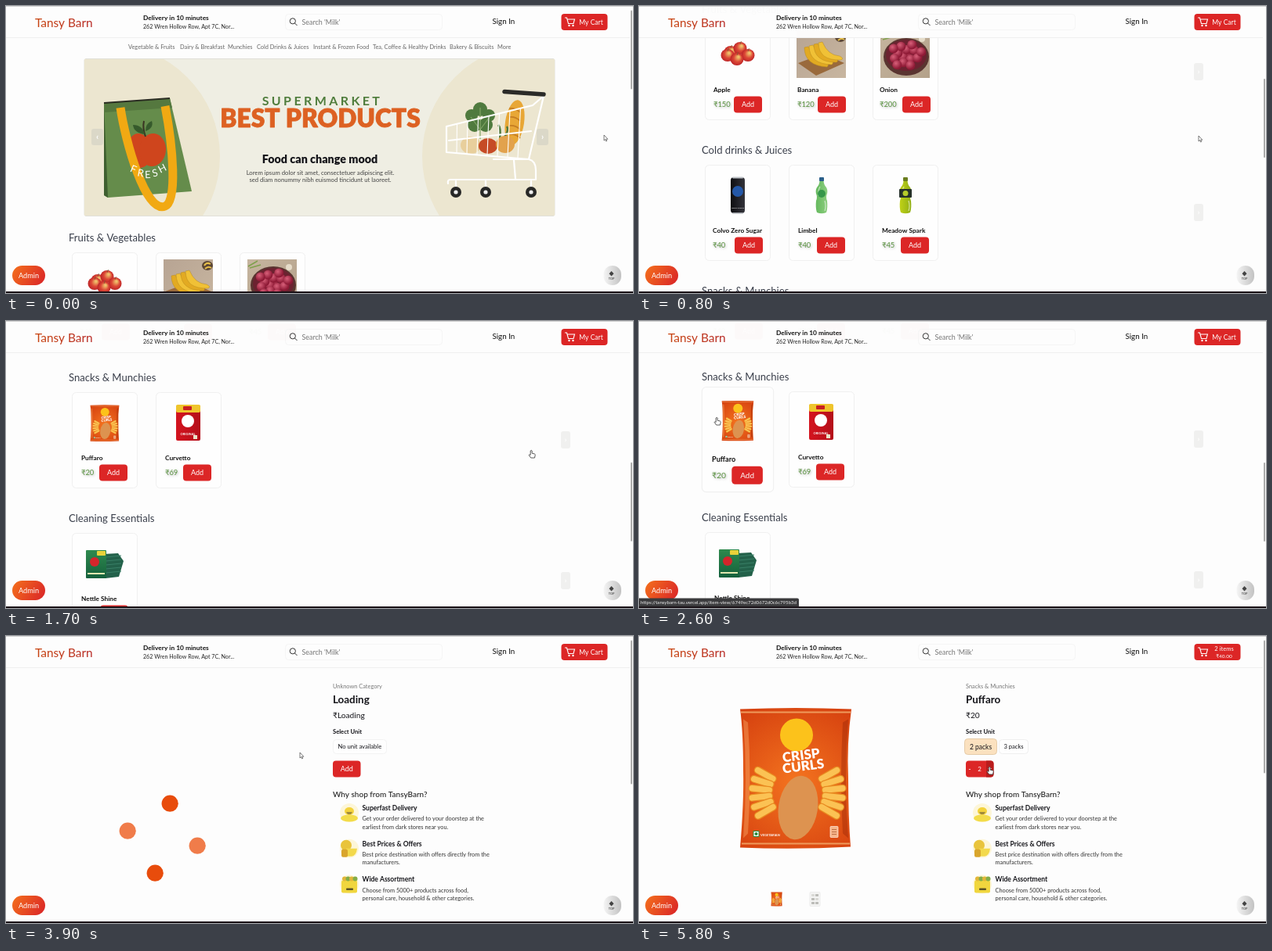
An HTML page with a canvas that plays this animation: 800 px wide and 367 px high, repeating every 5.9 s.

```html
<!DOCTYPE html>
<html lang="en">
<head>
<meta charset="utf-8">
<title>Grocery shop demo</title>
<style>
html, body { margin: 0; width: 100%; height: 100%; overflow: hidden; background: #fdfdfd; }
canvas { display: block; width: 800px; height: 367px; }
</style>
</head>
<body>
<canvas id="stage"></canvas>
<script>
const LOOP = 5900, STEP = 100;
const OPEN = 3300, LOADED = 4100, ADD = 5400, MORE = 5700;
const RED = '#dc2626', INK = '#15151a';
const canvas = document.getElementById('stage');
const c = canvas.getContext('2d');
const dpr = window.devicePixelRatio || 1;
canvas.width = 800 * dpr;
canvas.height = 367 * dpr;

// time followed by values
const SCROLL = [[0, 0], [150, 0], [800, 292], [1500, 550], [1700, 584], [1800, 585]];
const POINTER = [
  [0, 763, 165], [100, 762, 165], [800, 714, 166], [1700, 670, 165], [1900, 610, 160],
  [2400, 103, 128], [2600, 99, 123], [3600, 97, 124], [3900, 375, 149],
  [4200, 541, 32], [4700, 478, 164], [4800, 449, 167], [5000, 447, 167]
];

function at(track, t, i = 1) {
  const n = track.findIndex(k => k[0] > t);
  if (n < 0) return track[track.length - 1][i];
  const a = track[n - 1], b = track[n];
  return a[i] + (b[i] - a[i]) * (t - a[0]) / (b[0] - a[0]);
}

function text(s, x, y, size, color = INK, weight = 400, align = 'left') {
  c.font = `${weight} ${size}px Lato, "Open Sans", sans-serif`;
  c.textAlign = align;
  c.fillStyle = color;
  c.fillText(s, x, y);
}

function box(x, y, w, h, r, fill, stroke, width = 1) {
  c.beginPath();
  c.roundRect(x, y, w, h, r);
  paint(fill, stroke, width);
}

function paint(fill, stroke, width = 1) {
  if (fill) { c.fillStyle = fill; c.fill(); }
  if (stroke) { c.strokeStyle = stroke; c.lineWidth = width; c.stroke(); }
}

function dot(x, y, r, fill, ry = r, turn = 0) {
  c.beginPath();
  c.ellipse(x, y, r, ry, turn, 0, 7);
  paint(fill);
}

function shape(d, fill, stroke, width = 1) {
  const p = new Path2D(d);
  if (fill) { c.fillStyle = fill; c.fill(p); }
  if (stroke) { c.strokeStyle = stroke; c.lineWidth = width; c.stroke(p); }
}

function fade(x0, y0, x1, y1, a, b) {
  const g = c.createLinearGradient(x0, y0, x1, y1);
  g.addColorStop(0, a);
  g.addColorStop(1, b);
  return g;
}

function glow(x, y, r, a, b) {
  const g = c.createRadialGradient(x, y, 0, x, y, r);
  g.addColorStop(0, a);
  g.addColorStop(1, b);
  return g;
}

function group(x, y, k, draw) {
  c.save();
  c.translate(x, y);
  c.scale(k, k);
  draw();
  c.restore();
}

// snack bag, 142 by 179
function bag() {
  shape('M0 1Q71 -2 142 1Q136 45 138 90Q138 140 141 177Q70 181 0 178Q5 120 4 80Q4 30 0 1Z',
    glow(72, 95, 115, '#f4741f', '#d5400f'));
  shape('M4 14Q10 90 4 166L10 160Q15 90 10 18Z', 'rgba(255,190,120,.35)');
  shape('M138 14Q132 90 138 166L131 160Q127 90 131 18Z', 'rgba(130,25,0,.3)');
  shape('M1 5L141 5M2 173L140 173', null, '#ef9a5c', 2);
  c.lineCap = 'round';
  for (const side of [-1, 1]) {
    for (let i = 0; i < 6; i++) {
      const a = -.52 + i * .21;
      const ray = r => [73 + side * r * Math.cos(a), 108 + r * Math.sin(a)];
      for (const [w, col] of [[10, '#e88a20'], [7.5, '#fbc254']]) {
        c.beginPath();
        c.moveTo(...ray(36));
        c.lineTo(...ray(58));
        paint(null, col, w);
      }
    }
  }
  c.lineCap = 'butt';
  dot(72, 34, 21, '#fcc21b');
  c.save();
  c.translate(78, 62);
  c.rotate(-.13);
  text('CRISP', 0, 4, 17, '#fff', 900, 'center');
  text('CURLS', 1, 18, 17, '#fff', 900, 'center');
  c.restore();
  dot(74, 127, 25, '#dd9350', 41, .15);
  box(17, 157, 7, 7, 0, '#fff', '#2a8a3a');
  dot(20.5, 160.5, 2, '#2a8a3a');
  text('VEGETARIAN', 26, 163, 4, '#fff', 700);
  box(115, 151, 10, 14, 1, '#f7b489', '#fff', .6);
  shape('M117 155H123M117 158H123M117 161H123', null, '#a3512a', .7);
}

function photo(a, b) {
  box(10, 9, 63, 60, 0, fade(10, 9, 73, 69, a, b));
}

function apples() {
  const spots = [[33, 36], [45, 31], [29, 40], [55, 40], [41, 45]];
  for (const [x, y] of spots) {
    const g = c.createRadialGradient(x + 2, y - 3, 1, x, y, 9);
    g.addColorStop(0, '#efc16b');
    g.addColorStop(.5, '#dc4836');
    g.addColorStop(1, '#b81f25');
    dot(x, y, 8.5, g, 8);
    shape(`M${x} ${y - 5}l1.5 -4`, null, '#7a5a34', .8);
  }
}

function bananas() {
  photo('#b7a493', '#c8b6a0');
  dot(66, 17, 7, '#5b4636', 6);
  shape('M62 17q3 -5 8 -2M63 21q4 -4 8 -1', null, '#e8c04a', 2);
  shape('M12 50L44 38L71 50L35 66Z', '#9a6a3c');
  for (let i = 0; i < 4; i++) {
    const x = 20 + i * 6, y = 30 - i * 2;
    shape(`M${x} ${y}Q${x} ${y + 23} ${x + 29} ${y + 25 - i}Q${x + 33} ${y + 20} ${x + 27} ${y + 17}Q${x + 12} ${y + 16} ${x + 5} ${y - 1}Z`,
      i % 2 ? '#f0c136' : '#e2aa22', '#b98a1c', .5);
  }
}

function onions() {
  photo('#c6b59f', '#b3a18a');
  shape('M11 18l12 -7m-10 9l14 -4', null, '#7fa04d', 1.5);
  dot(63, 19, 4, '#e6dcc9');
  dot(43, 42, 29, '#5a3430', 24);
  dot(43, 40, 26, '#6c2230', 20);
  for (let i = 0; i < 15; i++) {
    const r = Math.sqrt(i / 15) * 21, a = i * 2.4;
    const x = 43 + r * Math.cos(a), y = 39 + r * .8 * Math.sin(a);
    dot(x, y, 6, glow(x - 1.5, y - 2, 7, '#d8607a', '#8f1a36'));
  }
}

function can() {
  box(33, 16, 18, 46, 4, fade(33, 0, 51, 0, '#0d0d10', '#34343b'));
  box(35, 15.5, 14, 2, 1, '#bfc3c8');
  box(35, 61, 14, 1.5, 1, '#9a9ea4');
  dot(42, 34, 7, '#2458a8');
  text('ZERO SUGAR', 42, 56, 2.6, '#ddd', 700, 'center');
}

function bottle(body, edge, cap, label) {
  shape('M39.5 20h5q0 5 3.5 9q2 3 1 8q-2 4 0 9q1 9 -1 15q-6 2.5 -12 0q-2 -6 -1 -15q2 -5 0 -9q-1 -5 1 -8q3.5 -4 3.5 -9Z',
    fade(34, 0, 50, 0, body, edge));
  shape('M40 28q-3 5 -2 12m8 6q2 7 0 13', null, 'rgba(255,255,255,.55)', 1.3);
  box(39, 16, 6, 5, 1, cap);
  label();
}

const limeBottle = () => bottle('#63b85c', '#8ecf80', '#2b5f8a', () => dot(42, 37, 5, '#36974a'));
const sparkBottle = () => bottle('#c2d317', '#8fae16', '#6a7d1f', () => {
  box(34, 31, 16, 11, 1, '#26312a');
  dot(42, 36.5, 3.5, '#b5cc2a');
});

function tube() {
  box(26, 17, 31, 45, 2, fade(26, 0, 57, 0, '#d4141f', '#b40f1a'));
  box(26, 16, 31, 10, 2, '#efc52c');
  box(35, 18, 11, 5, 1, '#c92020');
  dot(41, 37, 8, '#fff');
  text('ORIGINAL', 41, 55, 4, '#fff', 700, 'center');
  box(48, 55, 5, 5, 0, '#e9e2c8');
}

function scrubber() {
  shape('M41 27L59 26L66 36L60 56L43 58Z', '#23614a');
  for (let i = 0; i < 5; i++) shape(`M43 ${31 + i * 5}L63 ${29 + i * 5}`, null, '#398067', 1);
  box(18, 22, 26, 36, 1, fade(18, 22, 18, 58, '#2f8a4e', '#14603c'));
  dot(29, 37, 6, '#d4252b');
  box(32, 23, 11, 6, 1, '#e9d23a');
  shape('M20 52H42', null, '#dfe7b0', 2);
}

// name, price, left inset, button inset, artwork
const SECTIONS = [
  ['Fruits & Vegetables', [['Apple', 150, 11, 37, apples], ['Banana', 120, 11, 37, bananas], ['Onion', 200, 9, 38, onions]]],
  ['Cold drinks & Juices', [['Colvo Zero Sugar', 40, 10, 38, can], ['Limbel', 40, 12, 36, limeBottle], ['Meadow Spark', 45, 12, 36, sparkBottle]]],
  ['Snacks & Munchies', [['Puffaro', 20, 12, 35, () => group(23.5, 16.5, .26, bag)], ['Curvetto', 69, 12, 35, tube]]],
  ['Cleaning Essentials', [['Nettle Shine', 35, 12, 36, scrubber]]]
];

function addButton(x, y, w = 36) {
  box(x, y, w, 21, 4, RED);
  text('Add', x + w / 2, y + 13.8, 9, '#fff', 400, 'center');
}

function card(x, y, [name, price, inset, btn, art], scale) {
  c.save();
  c.translate(x + 42, y + 61);
  c.scale(scale, scale);
  c.translate(-42, -61);
  box(.5, .5, 83, 122, 5, '#fefefe', '#f0f0f0');
  art();
  text(name, inset, 87, 8.3, '#111', 700);
  c.shadowColor = 'rgba(0,0,0,.3)';
  c.shadowBlur = 3 * dpr;
  c.shadowOffsetX = c.shadowOffsetY = dpr;
  text('₹' + price, inset, 106, 9.4, '#5a9440');
  c.shadowColor = 'transparent';
  addButton(btn, 92.5);
  c.restore();
}

function banner() {
  box(100, 67.5, 600, 201, 2, '#efeee3', '#dcdbd2', .8);
  c.save();
  c.beginPath();
  c.rect(100, 68, 600, 200);
  c.clip();
  dot(130, 192, 143, '#ece6d0');
  dot(674, 192, 143, '#ece6d0');
  c.restore();

  c.letterSpacing = '3.4px';
  text('SUPERMARKET', 403.5, 126.5, 16, '#4f7d3c', 700, 'center');
  c.letterSpacing = '0px';
  c.lineJoin = 'round';
  text('BEST PRODUCTS', 401, 155, 31.7, '#dd6122', 900, 'center');
  c.strokeStyle = '#dd6122';
  c.lineWidth = .8;
  c.strokeText('BEST PRODUCTS', 401, 155);
  text('Food can change mood', 400.5, 200.5, 14.3, INK, 900, 'center');
  text('Lorem ipsum dolor sit amet, consectetuer adipiscing elit.', 401, 215.5, 7.7, '#444', 400, 'center');
  text('sed diam nonummy nibh euismod tincidunt ut laoreet.', 401, 224.5, 7.7, '#444', 400, 'center');

  shoppingBag();
  trolley();
  for (const [x, s] of [[109, '‹'], [677, '›']]) {
    box(x, 157, 15, 21, 3, 'rgba(190,190,185,.35)');
    text(s, x + 7.5, 171, 11, '#fff', 700, 'center');
  }
}

function shoppingBag() {
  shape('M125 124L209 118L237 237L130 245L125 242Z', '#658c4b');
  shape('M125 124L130 245L125 242Z', '#3f5f30');
  shape('M125 124L209 118L212 130L126 136Z', '#55783f');
  shape('M125 124L209 118', null, '#2a2c22', 2);
  dot(170, 185, 16, '#cf451d', 22, -.1);
  dot(187, 184, 17, '#cf451d', 21, .1);
  shape('M178 167Q174 156 176 147', null, '#3a3423', 2);
  shape('M177 164Q163 162 162 152Q174 152 177 164Z', '#365a2c');
  shape('M178 160Q178 150 186 147Q189 156 178 160Z', '#365a2c');
  shape('M146 130C152 172 178 266 203 256C219 250 213 180 203 128', null, '#f1a913', 11);
  [...'FRESH'].forEach((ch, i) => {
    c.save();
    c.translate(162 + i * 9.5, 213 + [-3, 2, 4, 2, -4][i]);
    c.rotate(.4 - i * .22);
    text(ch, 0, 3, 13, '#fff', 400, 'center');
    c.restore();
  });
}

function trolley() {
  dot(649, 149, 12, '#e8a736', 29, .15);
  for (let i = 0; i < 4; i++) shape(`M642 ${131 + i * 11}q8 -1 14 5`, null, '#c57d22', 1.6);
  for (const [x, y, r] of [[605, 132, 9], [594, 140, 8], [616, 140, 8], [598, 152, 9], [612, 152, 9]]) dot(x, y, r, '#4f7a3e');
  shape('M605 130V170M605 158L593 142M605 158L617 142', null, '#7fa364', 1.2);
  shape('M630 170Q632 156 628 152M636 168Q642 158 639 154', null, '#4f7a3e', 2.5);
  dot(593, 178, 13, '#e8cf9c', 11);
  dot(615, 179, 12, '#c64b26', 10);
  dot(637, 177, 12, '#e2a24d', 11);
  c.lineCap = 'round';
  shape('M562 154L672 127L686 115L667 196L562 187ZM562 154V187M565 172L670 160', null, '#fff', 2.2);
  for (let i = 1; i < 8; i++) shape(`M${562 + i * 13.5} ${154 - i * 3.3}L${562 + i * 13} ${187 + i}`, null, '#fff', 1.1);
  shape('M622 196H667Q676 198 676 210V222H567Q563 222 564 227M648 197L650 221M574 224V232M612 224V232M670 224V232', null, '#fff', 2.2);
  shape('M636 109.5L686 113', null, '#2b2b28', 5.5);
  c.lineCap = 'butt';
  for (const x of [574, 612, 670]) { dot(x, 238, 7, '#272726'); dot(x, 238, 2.6, '#eee'); }
}

const NAV = [[156, 'Vegetable & Fruits'], [222, 'Dairy & Breakfast'], [283, 'Munchies'], [320, 'Cold Drinks & Juices'],
  [392, 'Instant & Frozen Food'], [468, 'Tea, Coffee & Healthy Drinks'], [566, 'Bakery & Biscuits'], [627, 'More']];

function home(t) {
  const y0 = at(SCROLL, t);
  c.save();
  c.translate(0, -y0);
  for (const [x, s] of NAV) text(s, x, 54.5, 7.4, '#666');
  banner();
  SECTIONS.forEach(([title, items], row) => {
    const y = 296 + row * 180;
    text(title, 80, y + 4.5, 13.1, '#3a3f4b');
    items.forEach((item, i) => {
      const hover = row === 2 && i === 0 ? Math.min(1, Math.max(0, (t - 2300) / 200)) : 0;
      card(84 + i * 107, y + 19, item, 1 + .1 * hover);
    });
    if (y0 > 0) {
      box(708, y + 69, 12, 22, 3, '#f0f0ef');
      text('›', 714, y + 83, 9, '#fff', 700, 'center');
    }
  });
  c.restore();
  thumb(5.5 + y0 * .3, 101);
}

const PERKS = [
  ['Superfast Delivery', 'Get your order delivered to your doorstep at the', 'earliest from dark stores near you.'],
  ['Best Prices & Offers', 'Best price destination with offers directly from the', 'manufacturers.'],
  ['Wide Assortment', 'Choose from 5000+ products across food,', 'personal care, household & other categories.']
];

function perkIcon(i, y) {
  dot(438, y, 12, '#fdf6d8');
  if (i === 0) {
    dot(438, y + 7, 11, '#f3dc4a', 4.5);
    dot(438, y - 2, 6, '#f3d23c', 5);
    shape(`M434 ${y - 1}h8l-2 3h-4Z`, '#a08a3c');
  } else if (i === 1) {
    dot(434, y - 4, 7, '#e9c43c');
    shape(`M434 ${y}h14q-1 9 -7 10h-6Z`, '#f3d94c');
    box(428, y + 1, 8, 10, 2, '#d9a52c');
  } else {
    box(428, y - 5, 20, 16, 2, '#f0d63e');
    for (let k = 0; k < 4; k++) dot(432 + k * 4.5, y - 7, 3, k % 2 ? '#84ad48' : '#e3b73a');
    box(434, y + 5, 9, 2.5, 1, '#5b5324');
  }
}

function detail(t) {
  const ready = t >= LOADED;
  text(ready ? 'Snacks & Munchies' : 'Unknown Category', 417, 66.5, 7.4, '#777');
  text(ready ? 'Puffaro' : 'Loading', 417, 86, 13.4, INK, 700);
  text(ready ? '₹20' : '₹Loading', 417, 104.5, 10.2, INK);
  text('Select Unit', 417, 125, 7.6, INK, 700);
  if (ready) {
    box(415.5, 131.5, 41, 20, 4, '#fbe1bf', '#e0c39c', .8);
    text('2 packs', 436, 144.5, 8.5, INK, 400, 'center');
    box(459.5, 132.5, 37, 18, 4, '#fefefe', '#efefef');
    text('3 packs', 478, 144.3, 7.6, INK, 400, 'center');
    group(129, 92.5, 1, bag);
    group(168.5, 327.5, .1, bag);
    box(218, 327.5, 13, 18, 1, '#f4f4f3', '#e4e4e4', .6);
    for (let i = 0; i < 6; i++) box(220 + (i % 2) * 5, 330 + (i >> 1) * 5, 4, 3, 0, i % 3 ? '#bdbdb9' : '#dadad6');
  } else {
    box(417.5, 132.5, 68, 18, 4, '#fefefe', '#f3f3f3');
    text('No unit available', 423.5, 144.3, 7.6, INK);
    for (let i = 0; i < 4; i++) {
      const a = .21 + (t - 3900) * Math.PI / 600 + i * Math.PI / 2;
      dot(199.7 + 45.5 * Math.sin(a), 258.7 - 45.5 * Math.cos(a), 10.6, i % 2 ? '#f07c4a' : '#e84c0c');
    }
  }
  if (t < ADD) addButton(417, 159.5, 35.5);
  else {
    box(417, 159.5, 35.5, 21, 4, RED);
    box(443, 159.5, 9.5, 21, [0, 4, 4, 0], '#b91c1c');
    text('-', 422, 173, 9, '#fff', 400, 'center');
    text(t < MORE ? '1' : '2', 434.5, 173, 8, '#fff', 400, 'center');
    text('+', 447.5, 173, 9, '#fff', 400, 'center');
  }
  text('Why shop from TansyBarn?', 417, 206, 10, '#222', 500);
  PERKS.forEach(([title, a, b], i) => {
    const y = 223 + i * 45.7;
    perkIcon(i, y + 3);
    text(title, 454.5, y, 8.5, INK, 700);
    text(a, 454.5, y + 13.3, 7.35, '#333');
    text(b, 454.5, y + 23.6, 7.35, '#333');
  });
  thumb(5.5, ready ? 170 : 184);
}

function thumb(y, h) {
  box(797, y, 2, h, 1, '#aaa');
}

function header(t) {
  c.fillStyle = 'rgba(253,253,253,.98)';
  c.fillRect(0, 0, 796, 40);
  c.fillStyle = '#efefef';
  c.fillRect(0, 40, 796, 1);
  text('Tansy Barn', 37, 27, 15.4, fade(37, 0, 110, 0, '#c8440f', '#b82d28'));
  text('Delivery in 10 minutes', 175, 18.3, 8.4, '#111', 700);
  text('262 Wren Hollow Row, Apt 7C, Nor...', 175, 29.2, 7.1, '#222');
  box(356.5, 10.5, 200, 20, 4, null, '#f5f5f5');
  c.beginPath();
  c.arc(365.8, 19.3, 3.6, 0, 7);
  c.moveTo(368.5, 22);
  c.lineTo(371.5, 25);
  paint(null, '#333', 1);
  text("Search 'Milk'", 377.5, 23.5, 8.9, '#757575');
  text('Sign In', 620.5, 22.8, 9.8, '#111');

  box(708.5, 10, 59, 21, 4, RED);
  shape('M713 15h2.5l2 7.5h6.5l1.5 -5.5h-9', null, '#fff', 1.1);
  dot(718.5, 25, 1.2, '#fff');
  dot(723.5, 25, 1.2, '#fff');
  if (t < ADD) text('My Cart', 746.5, 23.5, 8.5, '#fff', 400, 'center');
  else {
    const n = t < MORE ? 1 : 2;
    text(n + ' items', 746.5, 18.5, 7.6, '#fff', 400, 'center');
    text(`₹${n * 20}.00`, 746.5, 27.5, 6.5, '#fff', 400, 'center');
  }
}

function floating(t) {
  box(8, 332, 42, 25, 12.5, fade(8, 332, 50, 357, '#f4701c', '#d92328'));
  text('Admin', 29, 347.8, 9.2, '#fff', 400, 'center');
  box(762.5, 332, 22.5, 25, 11.2, fade(762, 0, 785, 0, '#f6f6f6', '#c2c2c2'));
  shape('M772.5 339l3 3.2l-3 3.2l-3 -3.2Z', '#444');
  text('TOP', 772.5, 349.5, 3.8, '#555', 700, 'center');
  if (t >= 2400 && t < OPEN) {
    box(0, 354.5, 204, 11, [0, 2, 0, 0], '#3b3b3d');
    text('https://tansybarn-tau.vercel.app/item-view/6749ec72d0672d0c6c795b3d', 2, 362.2, 6.1, '#eee');
  }
  c.fillStyle = '#c9c9c9';
  c.fillRect(0, 0, 800, .8);
  c.fillStyle = '#1c1419';
  c.fillRect(0, 365, 800, 2);
}

function pointer(t) {
  const hand = (t >= 1500 && t < OPEN) || t >= 4800;
  group(at(POINTER, t), at(POINTER, t, 2), 1, () => {
    c.lineJoin = 'round';
    if (hand) shape('M-.8 1Q.2 -.4 1.2 1V4.2L4.5 5Q5.4 5.3 5.2 6.5L4.5 10H-.3L-2.8 6.5Q-2.8 5.2 -.8 6.3Z', '#fff', '#333', .8);
    else shape('M0 0V7L1.6 5.6L2.7 8L3.7 7.5L2.7 5.2H4.8Z', '#fff', '#444', .7);
  });
}

function draw(t) {
  c.setTransform(dpr, 0, 0, dpr, 0, 0);
  c.fillStyle = '#fdfdfd';
  c.fillRect(0, 0, 800, 367);
  if (t < OPEN) home(t);
  else detail(t);
  header(t);
  floating(t);
  pointer(t);
}

const start = performance.now();
function tick() {
  const t = (performance.now() - start) % LOOP;
  draw(Math.floor(t / STEP) * STEP);
  requestAnimationFrame(tick);
}
tick();
</script>
</body>
</html>
```
